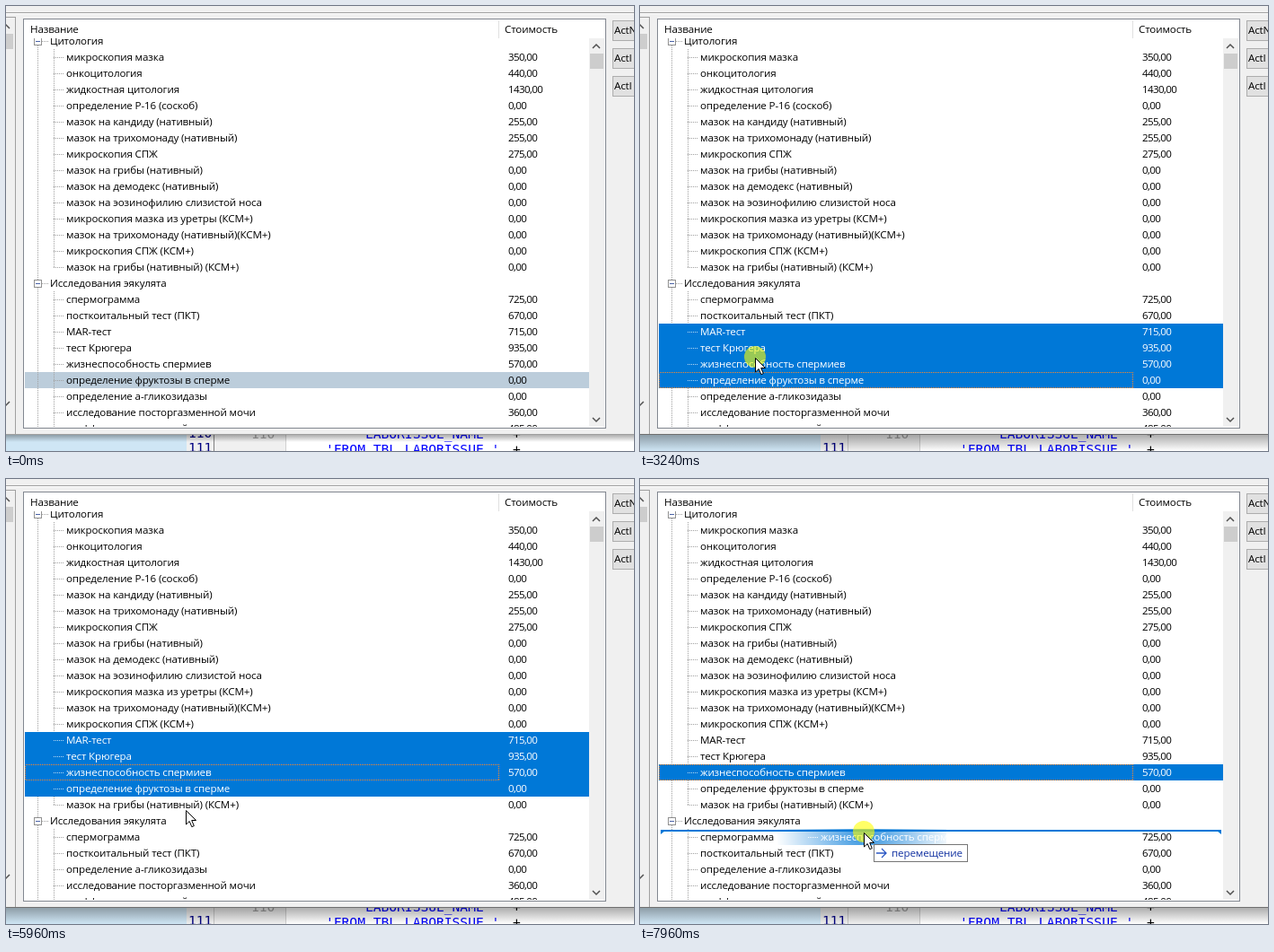
These frames come from a looping animation (699x496 px, 8 s). An HTML page:

```html
<!DOCTYPE html>
<html lang="ru">
<head>
<meta charset="utf-8">
<style>
html, body { margin: 0; width: 100%; height: 100%; overflow: hidden; background: #f0f0f0; }
svg { display: block; }
text { font: 11.6px "Open Sans", "Noto Sans", sans-serif; letter-spacing: -.14px; white-space: pre; }
.num { letter-spacing: -.64px; }
.code { font: 14.6px "DejaVu Sans Mono", monospace; letter-spacing: 0; }
rect, line { shape-rendering: crispEdges; }
</style>
</head>
<body>
<svg width="699" height="496">
  <defs>
    <clipPath id="body"><rect x="20" y="36" width="629" height="433"/></clipPath>
    <radialGradient id="glow" gradientUnits="userSpaceOnUse" cx="0" cy="0" r="99">
      <stop offset="0" stop-color="#fff" stop-opacity=".8"/>
      <stop offset="1" stop-color="#fff" stop-opacity="0"/>
    </radialGradient>
    <mask id="fade" maskUnits="userSpaceOnUse" x="-97" y="-60" width="188" height="120">
      <rect x="-97" y="-60" width="188" height="120" fill="url(#glow)"/>
    </mask>
    <linearGradient id="shade" x2="0" y2="1">
      <stop offset="0" stop-color="#000" stop-opacity=".32"/>
      <stop offset="1" stop-color="#000" stop-opacity="0"/>
    </linearGradient>
  </defs>
  <g id="back"></g>
  <g id="scene"></g>
</svg>
<script>
const BLUE = '#0078d7', GREY = '#a0a0a0', ROW = 18, TOP = 30, LOOP = 8000, TICK = 40;
const rowTop = i => TOP + i * ROW;

const rows = `Цитология
микроскопия мазка|350
онкоцитология|440
жидкостная цитология|1430
определение P-16 (соскоб)|0
мазок на кандиду (нативный)|255
мазок на трихомонаду (нативный)|255
микроскопия СПЖ|275
мазок на грибы (нативный)|0
мазок на демодекс (нативный)|0
мазок на эозинофилию слизистой носа|0
микроскопия мазка из уретры (КСМ+)|0
мазок на трихомонаду (нативный)(КСМ+)|0
микроскопия СПЖ (КСМ+)|0
мазок на грибы (нативный) (КСМ+)|0
Исследования эякулята
спермограмма|725
посткоитальный тест (ПКТ)|670
MAR-тест|715
тест Крюгера|935
жизнеспособность спермиев|570
определение фруктозы в сперме|0
определение а-гликозидазы|0
исследование посторгазменной мочи|360
коэффициент патологий|485`.split('\n').map(s => {
  const [name, price] = s.split('|');
  return { name, price };
});
const [mar, kruger, vital, fructose] = rows.slice(18, 22), block = [mar, kruger, vital, fructose];
const lastSmear = rows[14];
const moved = rows.filter(r => !block.includes(r));
moved.splice(14, 0, ...block);

// The pointer glides to x, y between two times and rests in between.
const glides = [
  { from: 360, to: 760, x: 139, y: 368 },
  { from: 960, to: 1240, x: 136, y: 380 },
  { from: 1800, to: 2320, x: 133, y: 419 },
  { from: 2800, to: 2960, x: 129, y: 392 },
  { from: 3240, to: 3600, x: 249, y: 313 },
  { from: 3600, to: 4120, x: 293, y: 284 },
  { from: 5280, to: 5760, x: 204, y: 372 },
  { from: 5920, to: 6600, x: 154, y: 325 },
  { from: 6680, to: 6960, x: 120, y: 322 },
  { from: 7240, to: 7920, x: 250, y: 394 }
];
// A press selects rows, or drags them by the grab point, after a short delay.
const DELAY = 80, DROP = 4680;
const presses = [
  { down: 880, up: 1000, picked: [mar], focus: mar },
  { down: 1680, up: 1840, picked: [mar, kruger], focus: kruger },
  { down: 2520, up: 2600, picked: block, focus: fructose },
  { down: 3200, up: DROP, picked: block, focus: vital, grab: [134, 389] },
  { down: 6600, up: 6760, picked: [vital], focus: vital },
  { down: 7200, up: LOOP, picked: [vital], focus: vital, grab: [116, 322] }
];
const idle = { picked: [fructose] };

const rect = (x, y, w, h, fill, more = '') => `<rect x="${x}" y="${y}" width="${w}" height="${h}" fill="${fill}" ${more}/>`;
const frame = (x, y, w, h, fill, edge, dash = '') =>
  rect(x + .5, y + .5, w - 1, h - 1, fill, `stroke="${edge}" stroke-dasharray="${dash}"`);
const text = (x, y, s, fill = '#000', cls = '') => `<text x="${x}" y="${y}" fill="${fill}" class="${cls}">${s}</text>`;
const code = (x, y, s, fill = '#0000ff') => text(x, y, s, fill, 'code');
const line = (x1, y1, x2, y2, color, dash = '') =>
  `<line x1="${x1}" y1="${y1}" x2="${x2}" y2="${y2}" stroke="${color}" stroke-dasharray="${dash}"/>`;
const hline = (y, x1, x2, color, dash) => line(x1, y + .5, x2, y + .5, color, dash);
const vline = (x, y1, y2, color, dash) => line(x + .5, y1, x + .5, y2, color, dash);
const chevron = (x, y, d) => `<path d="M${x - 4} ${y + 2 * d}l4 ${-4 * d}l4 ${4 * d}" fill="none" stroke="#505050" stroke-width="1.5"/>`;

function backdrop() {
  const buttons = ['ActN', 'ActI', 'ActI'].map((s, i) =>
    frame(675, 16 + 31 * i, 40, 23, '#e1e1e1', '#adadad') + text(677, 31 + 31 * i, s));
  return rect(0, 0, 699, 496, '#f0f0f0') + hline(7, 0, 699, GREY) + hline(8, 0, 699, '#fff')
    + hline(12, 0, 10, GREY) + vline(10, 12, 477, GREY)
    + rect(0, 31, 8, 17, '#cdcdcd') + chevron(0, 23, 1) + chevron(0, 443, -1)
    + frame(19, 14, 649, 457, '#fff', '#828790')
    + text(27, 30, 'Название') + text(555, 30, 'Стоимость') + vline(548, 16, 36, '#e0e0e0')
    + rect(649, 36, 17, 433, '#f0f0f0') + rect(650, 53, 15, 17, '#cdcdcd') + chevron(657, 45, 1) + chevron(657, 461, -1)
    + buttons.join('');
}

function editor(active) {
  return rect(0, 478, 699, 18, '#fff') + rect(0, 478, 201, 18, '#cfe6f5') + rect(201, 478, 110, 18, '#f0f0f0')
    + vline(311, 478, 496, '#d0d0d0') + vline(231, 478, 496, active ? '#c8c8c8' : '#808080')
    + (active ? '' : code(203, 481, '110', '#000080')) + code(203, 497, '111', '#000080')
    + code(273, 482, '110', GREY) + code(356, 482, "'    LABORISSUE_NAME '") + code(564, 482, '+', '#000')
    + code(356, 499, "'FROM TBL_LABORISSUE '") + code(564, 499, '+', '#000')
    + rect(0, 478, 699, active ? 18 : 8, 'url(#shade)')
    + rect(0, 471, 699, 6, '#f0f0f0') + hline(477, 0, 699, active ? '#707070' : GREY)
    + hline(470, 19, 668, '#828790') + vline(10, 470, 477, GREY);
}

function drawRow(r, i, { picked, focus }, active) {
  const y = rowTop(i), mid = y + 9, base = y + 13;
  if (!r.price) {
    return vline(35, y, y + ROW, GREY, '1 1') + hline(mid, 40, 47, GREY, '1 1') + frame(31, y + 5, 9, 9, '#fff', '#919191')
      + hline(mid, 33, 38, '#4b63a7') + text(49, base, r.name);
  }
  const on = picked.includes(r), lit = on && active, ink = lit ? '#fff' : '#000';
  return (on ? rect(21, y, 628, ROW, active ? BLUE : '#bccddb') : '')
    + (r == focus ? frame(21, y, 528, ROW, 'none', '#ff8728', '1 1') : '')
    + (lit ? '' : vline(35, y, y + ROW, GREY, '1 1') + vline(53, y, r == lastSmear ? mid : y + ROW, GREY, '1 1'))
    + hline(mid, 53, 64, lit ? '#b8d8f2' : GREY, '1 1')
    + text(67, base, r.name, ink) + text(559, base, r.price + ',00', ink, 'num');
}

// The drop mark sits on the nearer edge of the row under the pointer.
function dropMark(y) {
  const top = rowTop(Math.floor((y - TOP) / ROW)), upper = y - top < ROW / 2;
  const at = top + (upper ? 2 : 16), tip = upper ? 4 : -4;
  return rect(23, at - 1, 624, 2, BLUE) + `<path d="M23 ${at}v${tip}l5 ${-tip}zM647 ${at}v${tip}l-5 ${-tip}z" fill="${BLUE}"/>`;
}

function dragImage({ picked, grab }, list, x, y) {
  const tx = 67 - grab[0], ty = rowTop(list.indexOf(picked[0])) - grab[1];
  return `<g transform="translate(${x} ${y})" mask="url(#fade)">` + rect(-97, ty, 194, picked.length * ROW, BLUE)
    + picked.map((r, i) => hline(ty + i * ROW + 9, tx - 14, tx - 3, '#fff', '1 1') + text(tx, ty + i * ROW + 13, r.name, '#fff')).join('')
    + '</g>';
}

function hint(x, y, list) {
  const over = list[Math.floor((y - TOP) / ROW)];
  if (!over.price || block.includes(over)) {
    return `<g fill="#fff" stroke="#d03030" stroke-width="1.7"><circle cx="${x + 15}" cy="${y + 24}" r="5.3"/>`
      + `<path d="M${x + 11} ${y + 20}l8 8"/></g>`;
  }
  return frame(x + 10, y + 13, 105, 20, '#fff', '#767676')
    + `<path d="M${x + 13} ${y + 23}h11m-5 -5l5 5l-5 5" fill="none" stroke="#2b57c4" stroke-width="1.3"/>`
    + text(x + 30, y + 27, 'перемещение', '#1030a0');
}

function pointer(t) {
  let x = 165, y = 500;
  for (const g of glides) {
    const f = Math.min(1, Math.max(0, (t - g.from) / (g.to - g.from)));
    x += (g.x - x) * f;
    y += (g.y - y) * f;
  }
  return [Math.round(x), Math.round(y)];
}

function scene(t) {
  const pick = presses.filter(p => t >= p.down + DELAY).pop() || idle;
  const active = pick != idle, list = t < DROP ? rows : moved;
  const [x, y] = pointer(t);
  const dragging = pick.grab && t < pick.up;
  const pressed = presses.some(p => t >= p.down && t < p.up);
  return editor(active)
    + '<g clip-path="url(#body)">' + list.map((r, i) => drawRow(r, i, pick, active)).join('') + '</g>'
    + (dragging ? dropMark(y) + dragImage(pick, list, x, y) : '')
    + (pressed ? `<circle cx="${x - 1}" cy="${y - 1}" r="12" fill="#ffff00" opacity=".6"/>` : '')
    + (dragging ? hint(x, y, list) : '')
    + `<path transform="translate(${x - .5} ${y + .5})" d="M0 0V15.5L3.7 12L6.3 18.2L8.8 17.1L6.2 11H11Z" fill="#fff" stroke="#000"/>`;
}

const view = document.getElementById('scene');
document.getElementById('back').innerHTML = backdrop();
let shown = -1;
function play() {
  const t = Math.floor(performance.now() % LOOP / TICK) * TICK;
  if (t != shown) view.innerHTML = scene(shown = t);
  requestAnimationFrame(play);
}
play();
</script>
</body>
</html>
```
